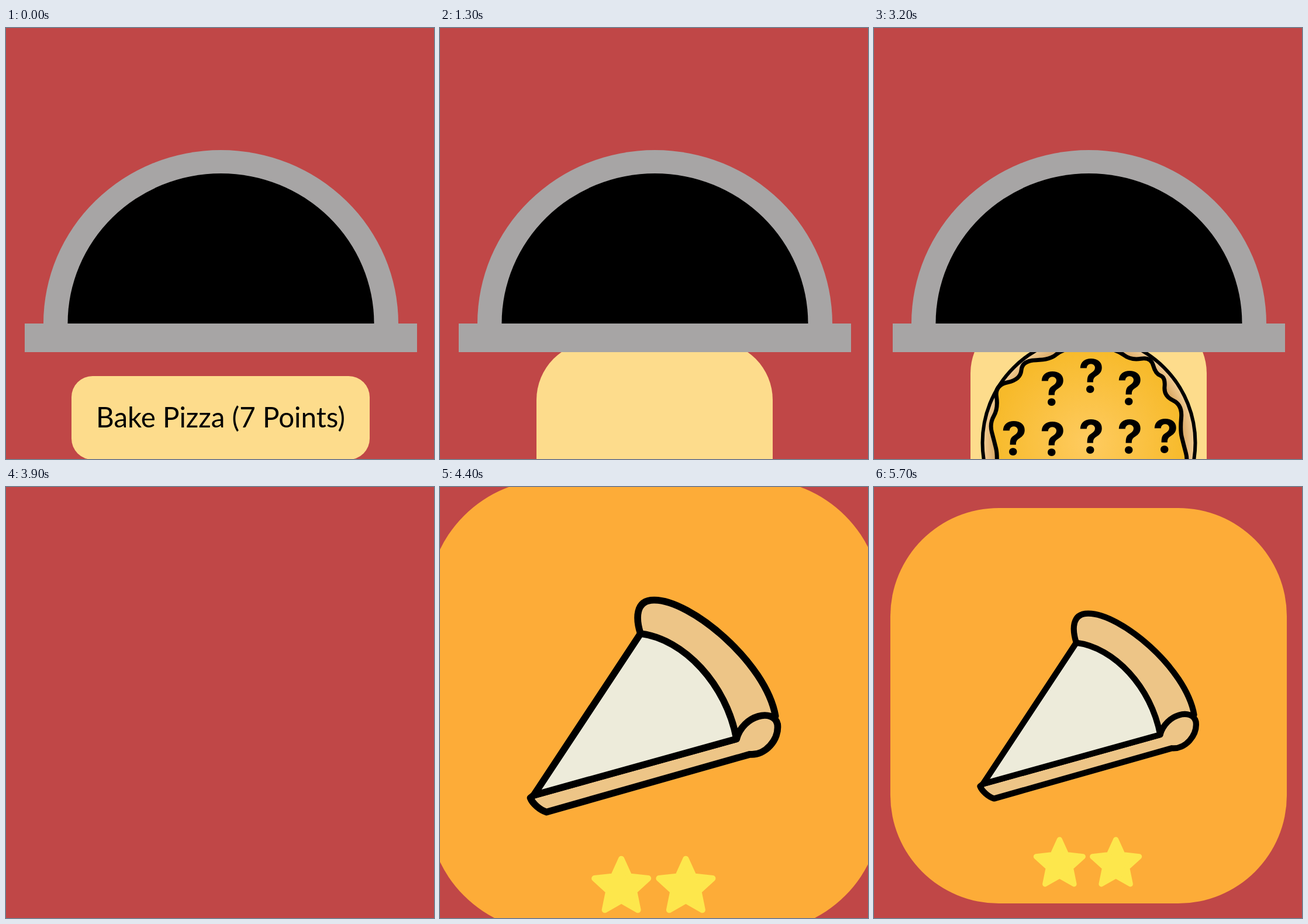
An HTML page that plays this animation: 732 by 738 pixels, repeating every 5800 ms.

```html
<!DOCTYPE html>
<html lang="en">
<head>
<meta charset="utf-8">
<title>Bake Pizza</title>
<style>
  html, body { margin: 0; width: 100%; height: 100%; overflow: hidden; background: #c04747; }
  svg { display: block; width: 100%; height: 100%; }
  .label { font: 47.5px Lato, sans-serif; text-anchor: middle; }
  .marks { font: 700 78px Inter, sans-serif; text-anchor: middle; }
  .ink { stroke: #000; stroke-linejoin: round; stroke-linecap: round; }
  .star { fill: #fde74c; stroke: #fde74c; stroke-width: 9; stroke-linejoin: round; }
</style>
</head>
<body>
<svg viewBox="0 0 732 738">
  <defs>
    <clipPath id="belowShelf"><rect y="555" width="732" height="183"/></clipPath>
    <radialGradient id="cheese">
      <stop offset="0" stop-color="#fecb60"/>
      <stop offset="1" stop-color="#f7ba2a"/>
    </radialGradient>
    <radialGradient id="crust">
      <stop offset=".88" stop-color="#d9a865"/>
      <stop offset="1" stop-color="#f5d099"/>
    </radialGradient>
  </defs>

  <g clip-path="url(#belowShelf)">
    <g id="peel">
      <rect x="350" y="400" width="34" height="900" fill="#fddc8c"/>
      <rect x="165" width="404" height="438" rx="100" fill="#fddc8c"/>
      <g id="pizza" transform="translate(367.5 219)">
        <circle class="ink" r="182" fill="url(#crust)" stroke-width="6"/>
        <path id="topping" class="ink" fill="url(#cheese)" stroke-width="7"/>
        <g id="marks" class="marks"></g>
      </g>
    </g>
  </g>

  <g id="oven" fill="#a7a5a5">
    <path d="M64 506A303.500 297 0 0 1 671 506Z"/>
    <path d="M105.500 506A262 257 0 0 1 629.500 506Z" fill="#000"/>
    <rect x="32" y="506" width="671" height="49"/>
  </g>

  <g id="button">
    <rect x="112" y="596" width="510" height="143" rx="36" fill="#fddc8c"/>
    <text class="label" x="367" y="684">Bake Pizza (7 Points)</text>
  </g>

  <g id="card">
    <rect x="29" y="37" width="676" height="675" rx="185" fill="#fdac38"/>
    <g class="ink" stroke-width="10.200" fill="#edc587">
      <path d="M346 267C339 245 338 217 366 217C420 216 533 310 547 390L489 424Z"/>
      <path d="M187 508L182 512C185 520 196 530 206 533L509 447C532 449 553 425 550 402C544 378 499 388 489 424Z"/>
      <path d="M346 267C411 275 474 343 489 424L187 508Z" fill="#edebda"/>
    </g>
    <path class="star" transform="translate(317.5 645)"/>
    <path class="star" transform="translate(413.5 645)"/>
  </g>
</svg>

<script>
const LOOP = 5800, STEP = 100;
const PEEL_OUT = 750, PEEL_IN = 90;
const el = id => document.getElementById(id);

const progress = (t, start, end) => Math.min(1, Math.max(0, (t - start) / (end - start)));
const easeInOut = p => (1 - Math.cos(Math.PI * p)) / 2;

function starPath(outer, inner) {
  const points = Array.from({ length: 10 }, (_, i) => {
    const angle = (i / 5 - 0.5) * Math.PI;
    const r = i % 2 ? inner : outer;
    return [r * Math.cos(angle), r * Math.sin(angle)];
  });
  return 'M' + points.join('L') + 'Z';
}

// Smooth closed outline: each point bends a curve between neighbouring midpoints
function smoothPath(points) {
  const middle = i => {
    const [a, b] = [points[i], points[(i + 1) % points.length]];
    return [(a[0] + b[0]) / 2, (a[1] + b[1]) / 2];
  };
  return 'M' + middle(points.length - 1) + points.map((p, i) => `Q${p} ${middle(i)}`).join('');
}

const upperEdge = [
  [-162, -3], [-170, -33], [-155, -59], [-161, -99], [-117, -108], [-114, -141], [-66, -142], [-46, -160],
  [0, -166], [47, -160], [72, -141], [106, -147], [114, -118], [131, -112], [128, -80], [160, -65], [156, -21]
];
const lowerEdge = upperEdge.map(([x, y]) => [-x, -y]);
el('topping').setAttribute('d', smoothPath([...upperEdge, ...lowerEdge]));

document.querySelectorAll('.star').forEach(star => star.setAttribute('d', starPath(42, 20)));

const markRows = [
  { y: [-64, -86, -65], x: [-62, 4, 70] },
  { y: [21, 22, 18, 18, 17], x: [-128, -62, 4, 70, 131] },
  { y: [106, 126, 106], x: [-62, 4, 70] }
];
el('marks').innerHTML = markRows.flatMap(row =>
  row.x.map((x, i) => `<text x="${x}" y="${row.y[i]}">?</text>`)).join('');

function cardScale(t) {
  return t < 4300
    ? 1.2 * progress(t, 3920, 4300)
    : 1 + 0.2 * Math.exp((4300 - t) / 335);
}

function draw(t) {
  el('button').setAttribute('opacity', 1 - progress(t, 0, 500));
  el('oven').setAttribute('opacity', 1 - progress(t, 3600, 3900));

  const inside = easeInOut(progress(t, 800, 2100)) - easeInOut(progress(t, 2460, 3760));
  el('peel').setAttribute('transform', `translate(0 ${PEEL_OUT + (PEEL_IN - PEEL_OUT) * inside})`);
  el('pizza').setAttribute('visibility', t > 2250 ? 'visible' : 'hidden');

  const scale = cardScale(t);
  el('card').setAttribute('visibility', scale > 0 ? 'visible' : 'hidden');
  el('card').setAttribute('transform', `translate(367 374.5) scale(${scale}) translate(-367 -374.5)`);
}

function tick() {
  const t = performance.now() % LOOP;
  draw(Math.floor(t / STEP) * STEP);
  requestAnimationFrame(tick);
}
tick();
</script>
</body>
</html>
```
